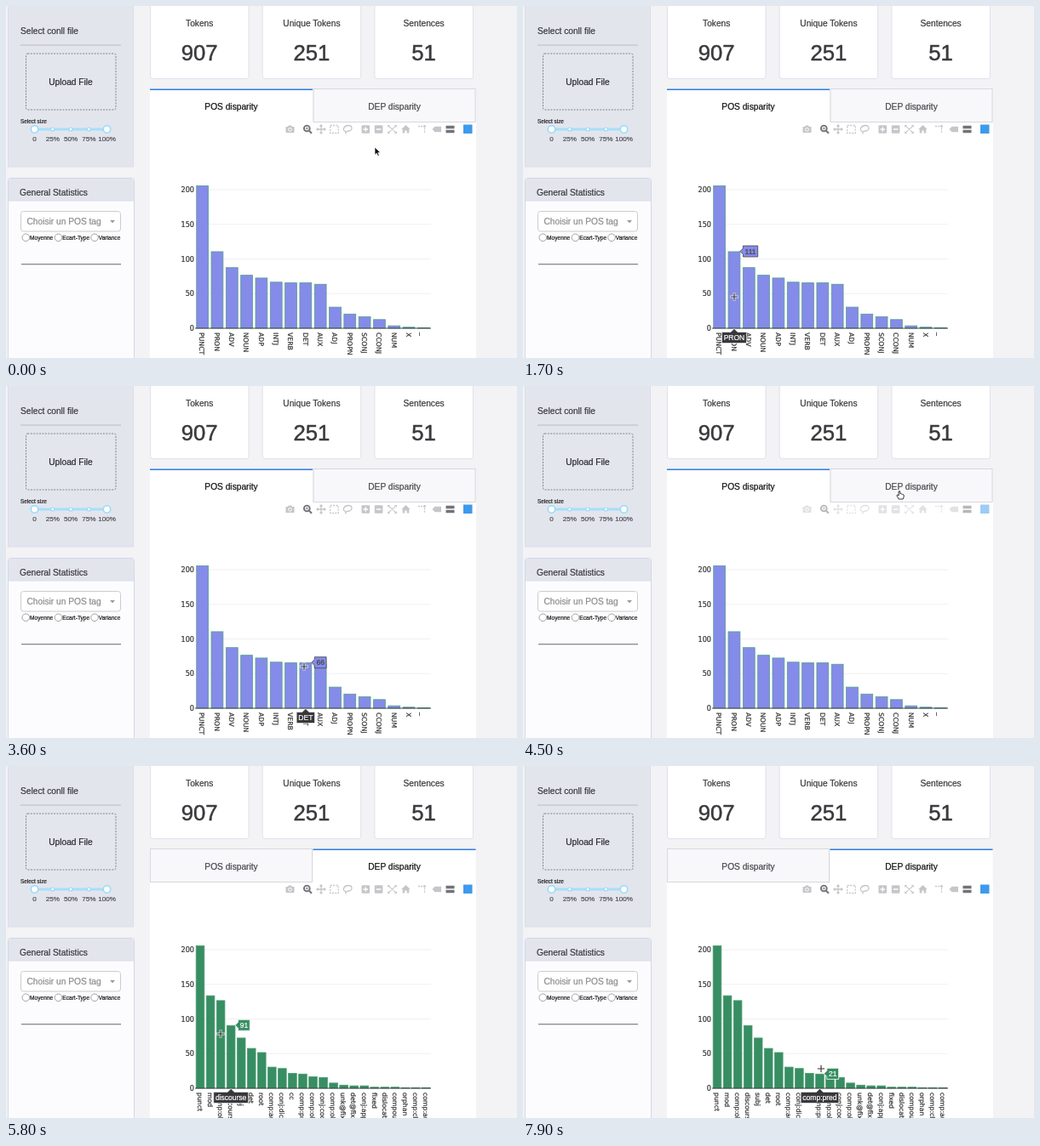
An HTML page that plays this animation: 600x414 px, repeating every 8000 ms.

```html
<!DOCTYPE html>
<html lang="en">
<head>
<meta charset="utf-8">
<title>Corpus dashboard</title>
<style>
  html, body { margin: 0; width: 100%; height: 100%; overflow: hidden; background: #f3f2f5; }
  svg { display: block; width: 600px; height: 414px; }
  text {
    font: 10.2px "Liberation Sans", Arial, sans-serif; white-space: pre;
    color: #3a3a3e; fill: currentColor; stroke: currentColor; stroke-width: .22px;
  }
  .mid { text-anchor: middle; }
  .big { font-size: 25.7px; stroke-width: .5px; }
  .mark { font-size: 8.1px; color: #505054; }
  .small { font-size: 6.6px; color: #222; }
  .tick { font: 8.1px "DejaVu Sans", Verdana, sans-serif; color: #333; }
  .name { font-size: 7.75px; }
  .tip { font-size: 8.5px; }
</style>
</head>
<body>
<svg id="stage" viewBox="0 0 600 414">
  <rect width="600" height="414" fill="#f3f2f5"/>
  <g id="side">
    <rect x="2.5" y="-4" width="147" height="193" fill="#e3e5ed" stroke="#dadeea"/>
    <text x="17" y="33">Select conll file</text>
    <path d="M17 46H135" stroke="#b9bbc3"/>
    <rect x="23.5" y="56" width="105.500" height="66" rx="2" fill="#e4e6ee" stroke="#66666c" stroke-dasharray="1.9 1.5" stroke-width=".8"/>
    <text class="mid" x="76" y="93" style="color:#2a2a2e">Upload File</text>
    <text class="small" x="17" y="138" style="font-size:6.4px">Select size</text>
    <path d="M33 145H119" stroke="#a6dffa" stroke-width="3"/>
    <rect x="2.5" y="202.5" width="148" height="220" rx="3" fill="#fcfcfe" stroke="#d3d7e8"/>
    <path d="M3 229V205.500Q3 203 5.500 203H147.500Q150 203 150 205.500V229Z" fill="#e3e5ed"/>
    <path d="M3 229H150" stroke="#dadeea"/>
    <text x="16" y="223">General Statistics</text>
    <rect x="17.500" y="241.500" width="117" height="23.500" rx="3" fill="#fff" stroke="#ccc"/>
    <text x="24.500" y="257" style="color:#8c8c8e">Choisir un POS tag</text>
    <path d="M122 252H128L125 255.300Z" fill="#999"/>
    <path d="M18 303.700H135" stroke="#66666c" stroke-width="1.100"/>
  </g>
  <g id="cards"></g>
  <rect x="169" y="136" width="383" height="278" fill="#fff"/>
  <g id="tabs"></g>
  <g id="tools" fill="none" stroke="#c6c6ca" stroke-width="1.300">
    <path d="M328.500 142H331L332 140.500H335L336 142H338.500V149H328.500Z" fill="#c6c6ca" stroke="none"/>
    <circle cx="333.500" cy="145.300" r="1.900" stroke="#fff" stroke-width="1"/>
    <g stroke="#727278"><circle cx="353.300" cy="144" r="3.400" stroke-width="1.900"/><path d="M356 146.700L359 149.800" stroke-width="2"/><path d="M351.800 144H354.800M353.300 142.500V145.500" stroke-width=".8"/></g>
    <path d="M365 145H375M370 140V150M368.500 141.500L370 140L371.500 141.500M368.500 148.500L370 150L371.500 148.500M366.500 143.500L365 145L366.500 146.500M373.500 143.500L375 145L373.500 146.500"/>
    <rect x="380.700" y="140.500" width="9.500" height="9" stroke-dasharray="2 1.400"/>
    <path d="M398.500 147.500C394 146 397 140.500 402 140.500S407.500 146 402.500 147C399 147.500 397.500 148 399.500 150.300"/>
    <g fill="#c6c6ca" stroke="none"><rect x="417.500" y="140.200" width="9.600" height="9.600" rx="1"/><rect x="432.800" y="140.200" width="9.600" height="9.600" rx="1"/></g>
    <path d="M419.500 145H425.100M422.300 142.200V147.800M434.800 145H440.400" stroke="#fff"/>
    <path d="M449.500 141.300L457.500 148.700M457.500 141.300L449.500 148.700M448.700 142.500V140.500H450.700M456.300 140.500H458.300V142.500M458.300 147.500V149.500H456.300M450.700 149.500H448.700V147.500" stroke-width="1.100"/>
    <path d="M469.500 140L474.700 145H473.300V149.500H470.700V146.500H468.300V149.500H465.700V145H464.300Z" fill="#c6c6ca" stroke="none"/>
    <path d="M484 141.500H490" stroke-dasharray="2 1.200"/><path d="M491.500 143.500V150" stroke-dasharray="2 1.200"/><circle cx="491.500" cy="141.500" r=".8"/>
    <path d="M500.500 145L503.500 141.800H511V148.200H503.500Z" fill="#c6c6ca" stroke="none"/>
    <path d="M516.500 144.300V140.800H526.500V144.300ZM516.500 149.300V145.800H526.500V149.300Z" fill="#727278" stroke="none"/>
    <rect x="537" y="139.500" width="10.500" height="10.500" fill="#3d9aec" stroke="none"/>
  </g>
  <g id="charts"></g>
  <g id="hover"></g>
  <g id="cursors">
    <path id="arrow" d="M0 0V9.200L2.200 7.200L3.700 10.500L5.300 9.800L3.800 6.600H6.700Z" fill="#111" stroke="#fff" stroke-width=".7"/>
    <g id="cross"><path d="M-4.800 0H4.800M0 -4.800V4.800" stroke="#fff" stroke-width="2.800" opacity=".8"/><path d="M-4.200 0H4.200M0 -4.200V4.200" stroke="#333" stroke-width="1.100"/></g>
    <path id="hand" d="M-1.800 5L-4 1.200Q-4.300 -.3 -2.600 .2L-1.900 1V-4Q-1 -5.200 -.2 -4V-1.200Q1 -1.900 1.500 -.9Q2.700 -1.300 3 -.3Q4.200 -.4 4.200 .7V2.200L3.200 5Z" fill="#fff" stroke="#222" stroke-width=".9"/>
  </g>
</svg>
<script>
const LOOP = 8000, STEP = 100, LAG = 60, SWITCH = 4800;
const X0 = 222, X1 = 499, Y0 = 379, TOP = 202, UNIT = 0.815;
const $ = id => document.getElementById(id);

function add(parent, tag, attrs, text) {
  const node = document.createElementNS("http://www.w3.org/2000/svg", tag);
  for (const key in attrs) node.setAttribute(key, attrs[key]);
  if (text !== undefined) node.textContent = text;
  parent.appendChild(node);
  return node;
}
const show = (node, on) => node.setAttribute("visibility", on ? "visible" : "hidden");

// Slider and radio buttons
["0", "25%", "50%", "75%", "100%"].forEach((label, i) => {
  const end = i % 4 === 0, x = 33.5 + i * 21.25;
  add($("side"), "circle", { cx: x, cy: 145, r: end ? 4.2 : 2, fill: "#fff", stroke: "#96dbfa", "stroke-width": end ? 1.6 : 1.2 });
  add($("side"), "text", { x, y: 159, class: "mid mark" }, label);
});
[["Moyenne", 23.3], ["Ecart-Type", 61.5], ["Variance", 104]].forEach(([label, x]) => {
  add($("side"), "circle", { cx: x, cy: 272.3, r: 4.3, fill: "#fff", stroke: "#999", "stroke-width": .9 });
  add($("side"), "text", { x: x + 4.8, y: 274.6, class: "small" }, label);
});

[["Tokens", 907], ["Unique Tokens", 251], ["Sentences", 51]].forEach(([label, n], i) => {
  const x = 169.5 + i * 131.7, mid = x + 57.7;
  add($("cards"), "rect", { x, y: -5, width: 115.5, height: 90.5, rx: 3, fill: "#fff", stroke: "#dde1ee" });
  add($("cards"), "text", { x: mid, y: 24, class: "mid" }, label);
  add($("cards"), "text", { x: mid, y: 63.7, class: "mid big" }, n);
});

const tabs = ["POS disparity", "DEP disparity"].map((label, i) => {
  const x = 169 + i * 191.5, w = 191;
  const [on, off] = [0, 1].map(() => add($("tabs"), "g", {}));
  add(off, "rect", { x: x + .5, y: 97.5, width: w - 1, height: 39, fill: "#f8f7fa", stroke: "#d8d8de" });
  add(on, "rect", { x, y: 98, width: w, height: 40, fill: "#fff" });
  add(on, "path", { d: `M${x} 98.3H${x + w}`, stroke: "#2b7de0", "stroke-width": 1.4 });
  for (const [group, color] of [[on, "#111"], [off, "#48484c"]])
    add(group, "text", { x: x + 95.5, y: 121.5, class: "mid", style: "color:" + color }, label);
  return { on, off };
});

const charts = [
  {
    names: "PUNCT PRON ADV NOUN ADP INTJ VERB DET AUX ADJ PROPN SCONJ CCONJ NUM X _",
    values: [206, 111, 88, 77, 73, 67, 66, 66, 64, 31, 21, 17, 13, 4, 2, 1],
    fill: "#858be8", line: "#559f92", ink: "#444"
  },
  {
    names: "punct mod comp:obj discourse subj det root comp:aux conj:dicto cc comp:pred comp:obl conj:coord " +
      "comp:obl unk@fixed det@fixed conj:appos fixed dislocated compound orphan comp:cleft comp:aux",
    values: [206, 134, 127, 91, 73, 58, 52, 31, 29, 22, 21, 17, 16, 8, 5, 4, 4, 2, 2, 2, 1, 1, 1],
    fill: "#378e62", line: "#4a9b72", ink: "#fff"
  }
];

for (let v = 0; v <= 200; v += 50) {
  const y = Y0 - v * UNIT;
  if (v) add($("charts"), "path", { d: `M${X0} ${y}H${X1}`, stroke: "#f0f0f3" });
  add($("charts"), "text", { x: 221, y: y + 3, class: "tick", "text-anchor": "end" }, v);
}
for (const c of charts) {
  c.names = c.names.split(" ");
  c.pitch = (X1 - X0) / c.values.length;
  c.group = add($("charts"), "g", {});
  c.values.forEach((v, i) => {
    const mid = X0 + (i + .5) * c.pitch, w = c.pitch * .8, h = v * UNIT - .4;
    add(c.group, "rect", { x: mid - w / 2, y: Y0 - h, width: w, height: h, fill: c.fill, stroke: c.line, "stroke-width": .8 });
    add(c.group, "text", { transform: `translate(${mid - 3.2} 384) rotate(90)`, class: "tick name" }, c.names[i]);
  });
}
add($("charts"), "path", { d: `M${X0} 379H${X1}`, stroke: "#333", "stroke-width": .9 });

const tip = {
  box: add($("hover"), "path", { "stroke-width": .8 }),
  value: add($("hover"), "text", { class: "tip" }),
  label: add($("hover"), "path", { fill: "#38383c", stroke: "#fff", "stroke-width": .6 }),
  name: add($("hover"), "text", { class: "tip mid", style: "color:#fff" })
};

// Pointer path: time, x, y
const path = [
  [0, 433, 166], [200, 400, 198], [500, 275, 310], [700, 234, 335], [800, 232, 337],
  [1300, 233, 337], [1700, 248, 342], [2100, 262, 347], [2400, 276, 349], [2600, 276, 349], [3000, 300, 346],
  [3600, 350, 330], [3900, 395, 270], [4200, 436, 170], [4400, 443, 130], [4500, 443, 128],
  [4900, 443, 128], [5200, 400, 180], [5500, 310, 270], [5800, 252, 315], [6000, 236, 327],
  [6300, 234, 330], [6700, 258, 340], [7100, 291, 349], [7500, 318, 352], [7900, 350, 356], [8000, 350, 356]
];
function pointer(t) {
  const i = Math.max(1, path.findIndex(p => p[0] >= t));
  const [a, b] = [path[i - 1], path[i]];
  const k = Math.max(0, (t - a[0]) / (b[0] - a[0]));
  return [a[1] + (b[1] - a[1]) * k, a[2] + (b[2] - a[2]) * k];
}
const inPlot = ([x, y]) => x >= X0 && x < X1 && y >= TOP && y <= Y0;
const ramp = (t, from) => Math.min(1, Math.max(0, (t - from) / 300));

function drawTip(c, spot) {
  show($("hover"), inPlot(spot));
  if (!inPlot(spot)) return;
  const i = Math.floor((spot[0] - X0) / c.pitch), mid = X0 + (i + .5) * c.pitch;
  const x = mid + c.pitch * .4, y = Y0 - c.values[i] * UNIT;
  tip.value.textContent = c.values[i];
  tip.name.textContent = c.names[i];
  const r = x + 3.5 + tip.value.getComputedTextLength() + 4.4;
  tip.box.setAttribute("d", `M${x} ${y}L${x + 3.5} ${y - 3.5}V${y - 6.5}H${r}V${y + 6.5}H${x + 3.5}V${y + 3.5}Z`);
  tip.box.setAttribute("fill", c.fill);
  tip.box.setAttribute("stroke", c.ink);
  tip.value.setAttribute("x", x + 5.7);
  tip.value.setAttribute("y", y + 3);
  tip.value.style.color = c.ink;
  const half = tip.name.getComputedTextLength() / 2 + 2.2;
  tip.label.setAttribute("d", `M${mid} 379.5L${mid + 4} 383.5H${mid + half}V396.5H${mid - half}V383.5H${mid - 4}Z`);
  tip.name.setAttribute("x", mid);
  tip.name.setAttribute("y", 393);
}

function draw(t) {
  const active = t < SWITCH ? 0 : 1;
  tabs.forEach((tab, i) => { show(tab.on, i === active); show(tab.off, i !== active); });
  charts.forEach((c, i) => show(c.group, i === active));
  $("tools").setAttribute("opacity", 1 - ramp(t, 4350) + ramp(t, 5000));
  drawTip(charts[active], pointer(Math.max(0, t - LAG)));
  const at = pointer(t);
  const kind = inPlot(at) ? "cross" : at[1] < 137 ? "hand" : "arrow";
  for (const id of ["arrow", "cross", "hand"]) show($(id), id === kind);
  $("cursors").setAttribute("transform", `translate(${at[0]} ${at[1]})`);
}

const start = performance.now();
function tick() {
  const t = (performance.now() - start) % LOOP;
  draw(Math.floor(t / STEP) * STEP);
  requestAnimationFrame(tick);
}
tick();
</script>
</body>
</html>
```
